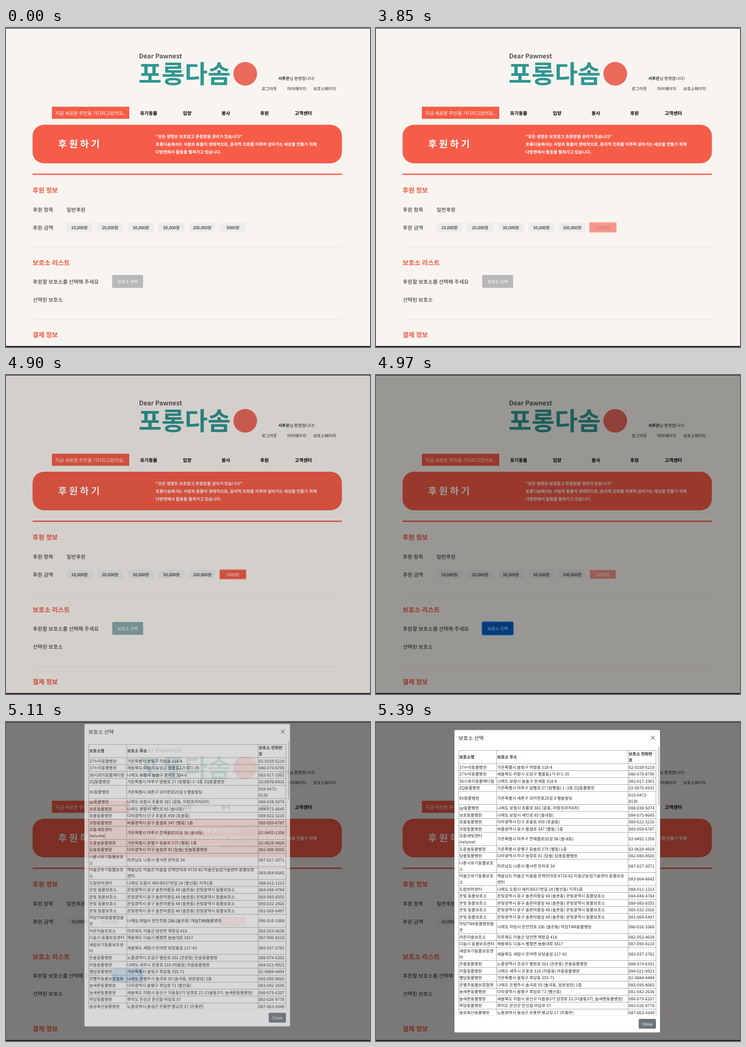
Recreate the animation shown at these times as an HTML page. Size 706x620 px, loop 8000 ms.

```html
<!DOCTYPE html>
<html>
<head>
<meta charset="utf-8">
<style>
html, body { margin: 0; width: 100%; height: 100%; overflow: hidden; background: #f8f4f0; }
svg { display: block; font-family: "Noto Sans CJK KR", "Noto Sans CJK", "Noto Sans", sans-serif; text-rendering: geometricPrecision; }
</style>
</head>
<body>
<svg id="stage" width="706" height="620" viewBox="0 0 706 620"></svg>
<script>
const RED = '#f65d48', INK = '#212529';
const stage = document.getElementById('stage');

const text = (x, y, str, size = 8, weight = 400, fill = INK, extra = '') =>
  `<text x="${x}" y="${y}" font-size="${size}" font-weight="${weight}" fill="${fill}" ${extra}>${str}</text>`;
const rect = (x, y, w, h, fill, rx = 0, extra = '') =>
  `<rect x="${x}" y="${y}" width="${w}" height="${h}" fill="${fill}" rx="${rx}" ${extra}/>`;
const middle = 'text-anchor="middle"';

// "/" marks a line break inside a cell
const shelters = `37누리동물병원|가온특별시 솔빛구 하람동 318-4
37누리동물병원|새솔북도 미람시 도담구 별울동1가 471-35
36시로미동물메디컬|나래도 보람시 늘솔구 온새동 314-6
ZQ동물병원|가온특별시 마루구 달별로 27 (달별동) 1~2층 ZQ동물병원
XV동물병원|가온특별시 새론구 모아란로25길 9 별솔빌딩|010-0472-/8135
qz동물병원|나래도 보람시 초롱로 381 (윤동, 아람프라자8차)
보로동물병원|나래도 보람시 새인로 85 (솔내동)
포솔동물병원|다라광역시 단구 포솔로 459 (포솔동)
모람동물병원|바롬광역시 윤구 돌샘로 347 (별동) 1층
모동새빛센터/(relume)|가온특별시 마루구 한재울로93길 58 (솔내동)
도윤솔동물병원|가온특별시 윤별구 등솔로 275 (별동) 1층
담솔동물병원|다라광역시 하구 늘항로 91 (담솔) 담솔동물병원
나룬시유기동물보호/소|미르남도 나룬시 별사면 은마로 34
미솔군유기동물보호/소|해솔남도 미솔군 미솔읍 은해안대로 4716-82 미솔군농업기술센터 동물보호/센터
도람반려센터|나래도 도람시 새리로637번길 24 (별산동) 지하1층
${'온빛 동물보호소|온빛광역시 윤구 솔촌마을길 48 (솔촌동) 온빛광역시 동물보호소\n'.repeat(4)}하담TNR동물병원솔/온|나래도 하담시 은안천로 256 (솔온동) 하담TNR동물병원
라온이솔보호소|미르북도 이솔군 담안면 해장길 418
다솜시 동물보호센터|해솔북도 다솜시 별평면 늘솔대로 3417
새람유기동물보호센/터|새솔북도 새람시 은야면 보담솔길 217-43
은솔동물병원|노을광역시 초성구 별원로 261 (은촌동) 은솔동물병원
라움동물병원|나래도 새주시 은꽃로 318 (라움동) 라움동물병원
별담동물병원|가온특별시 솔빛구 후담동 355-71
은별주동물보호협회|나래도 은별주시 솔곡로 55 (솔곡동, 달원빌딩) 1층
늘새론동물병원|다라광역시 솔평구 후담로 71 (별산동)
늘새론동물병원|새솔북도 미람시 윤산구 다솔동3가 담경로 22 (다솔동3가, 늘새론동물병원)
루담동물병원|루미도 은선군 은선읍 비담로 57
솔성축산동물병원|노을광역시 솔성군 은풍면 별교길 17 (은풍면)`.split('\n').map(row => row.split('|'));

function phone(address, i) {
  const last = 1000 + (i * 3571 + 4219) % 9000;
  return address.startsWith('가온')
    ? `02-0${100 + (i * 137 + 59) % 900}-${last}`
    : `0${81 + i * 5 % 9}-0${10 + (i * 37 + 23) % 90}-${last}`;
}

function table() {
  const columns = [160.5, 234, 489, 543];
  let y = 55.5, out = '', lines = `M160.5 ${y}H543`;
  const rows = [['보호소명', '보호소 주소', '보호소 전화번/호'],
    ...shelters.map(([name, address, tel], i) => [name, address, tel || phone(address, i)])];
  rows.forEach((row, r) => {
    const height = row.some(cell => cell.includes('/')) ? 25.5 : 13.5;
    row.forEach((cell, c) => cell.split('/').forEach((line, k, all) => {
      const base = y + height / 2 + 2.9 + (k - (all.length - 1) / 2) * 12;
      out += text(columns[c] + 1, base, line, 8, r ? 400 : 700);
    }));
    y += height;
    lines += `M160.5 ${y}H543`;
  });
  columns.forEach(x => lines += `M${x} 55.5V${y}`);
  return `<path d="${lines}" stroke="#9a9a9a" stroke-width=".8" fill="none"/>` + out;
}

const amounts = ['10,000원', '20,000원', '30,000원', '50,000원', '100,000원'];
const page =
  text(258, 59, 'Dear Pawnest', 12.4, 700, '#555') +
  text(257, 107, '포롱다솜', 48.6, 900, '#2f9691') +
  '<circle cx="464" cy="89" r="23" fill="#ea6a5c"/>' +
  text(528, 101, '<tspan font-weight="700">서루온</tspan>님 환영합니다!') +
  text(496, 121, '로그아웃') + text(545.5, 121, '마이페이지') + text(596, 121, '보호소페이지') +
  rect(89, 153, 150, 23.5, RED) +
  text(95.5, 169, '지금 새로운 주인을 기다리고있어요..', 9.1, 500, '#fff') +
  [[260, '유기동물'], [343, '입양'], [418, '봉사'], [493, '후원'], [560, '고객센터']]
    .map(([x, label]) => text(x, 169, label, 9.1, 700, '#000')).join('') +
  rect(51.5, 188, 600, 75, RED, 22) +
  text(101, 231.5, '후 원 하 기', 18.5, 700, '#fff') +
  ['"모든 생명은 보호받고 존중받을 권리가 있습니다"',
    '포롱다솜에서는 사람과 동물이 생태적으로, 윤리적 조화를 이루며 살아가는 세상을 만들기 위해',
    '다방면에서 활동을 펼쳐가고 있습니다.']
    .map((line, i) => text(290, 214 + i * 15, line, 8.13, 700, '#fff')).join('') +
  rect(51.5, 283, 600, 2.5, RED) +
  [[319.5, '후원 정보'], [460.5, '보호소 리스트'], [600.5, '결제 정보']]
    .map(([y, label]) => text(51.5, y, label, 12.6, 700, '#ee5a46')).join('') +
  [[356.5, '후원 항목'], [391.5, '후원 금액'], [496.5, '후원할 보호소를 선택해 주세요'], [531.5, '선택된 보호소']]
    .map(([y, label]) => text(52, y, label, 10.15, 500)).join('') +
  text(117.5, 356.5, '일반후원', 10) +
  amounts.map((label, i) =>
    rect(117.5 + i * 59.5, 379, 50, 17, '#ececec', 1) +
    text(142.5 + i * 59.5, 390.8, label, 8, 400, '#000', middle)).join('') +
  rect(414.3, 378.3, 51.4, 18.4, 'none', 1.5, 'id="amountRing" stroke="#f9a598" stroke-width="1.6"') +
  rect(415, 379, 50, 17, '#ececec', 1, 'id="amount"') +
  text(440, 390.8, '5000원', 8, 400, '#000', middle + ' id="amountText"') +
  rect(51.5, 425.5, 600, 1, '#ebe8e4') + rect(51.5, 565.5, 600, 1, '#ebe8e4') +
  rect(205.2, 479.2, 61.6, 26.6, 'none', 3, 'id="pickRing" stroke="#80bdff" stroke-width="1.6"') +
  rect(206, 480, 60, 25, '#b8b8b8', 2, 'id="pick"') +
  text(236, 495.8, '보호소 선택', 8.2, 500, '#fff', middle);

const modal =
  rect(152, 15.5, 399, 588, '#fff', 2.5, 'stroke="#000" stroke-opacity=".2" stroke-width=".6"') +
  text(160, 34.5, '보호소 선택', 10.15, 500) +
  '<path d="M533.5 27l7 7m0-7l-7 7" stroke="#7f7f7f" stroke-width="1.3"/>' +
  rect(152, 46, 399, .6, '#e3e6e9') + rect(152, 570, 399, .6, '#e3e6e9') +
  `<g clip-path="url(#body)">${table()}</g>` +
  rect(547.3, 49, 2.2, 113, '#c4c4c4', 1) +
  rect(509.5, 577, 33.5, 19, '#6c757d', 2) +
  text(526.2, 590, 'Close', 8.1, 500, '#fff', middle);

stage.innerHTML =
  '<clipPath id="body"><rect x="152" y="47" width="399" height="521.5"/></clipPath>' +
  rect(0, 0, 706, 620, '#f8f4f0') + page +
  rect(0, 0, 706, 620, '#000', 0, 'id="backdrop"') +
  `<g id="modal">${modal}</g>` +
  rect(0, 0, 706, 1, '#1d1b20') + rect(0, 618, 706, 2, '#211a22');

const [amount, amountText, amountRing, pick, pickRing, backdrop, dialog] =
  ['amount', 'amountText', 'amountRing', 'pick', 'pickRing', 'backdrop', 'modal']
    .map(id => document.getElementById(id));
const set = (el, name, value) => el.setAttribute(name, value);
const ramp = (t, start, length) => Math.min(1, Math.max(0, (t - start) / length));

function draw(now) {
  const t = Math.floor(now % 8000 / 70) * 70;
  const chosen = t >= 3850, settled = t >= 3920, opening = t >= 4900, opened = t >= 4970;

  set(amount, 'fill', !chosen ? '#ececec' : !settled || opened ? '#f4978b' : RED);
  set(amountText, 'fill', !chosen ? '#000' : settled ? '#fff' : '#b97a72');
  set(amountRing, 'opacity', chosen && !opened ? 1 : 0);
  set(pick, 'fill', opened ? '#0062cc' : opening ? '#8baaab' : '#b8b8b8');
  set(pickRing, 'opacity', opened ? 1 : 0);

  set(backdrop, 'opacity', .5 * ramp(t, 4855, 150));
  set(dialog, 'opacity', ramp(t, 5003, 150));
  set(dialog, 'transform', `translate(0 ${-25 * (1 - ramp(t, 5003, 300)) ** 1.7})`);
  requestAnimationFrame(draw);
}
requestAnimationFrame(draw);
</script>
</body>
</html>
```
